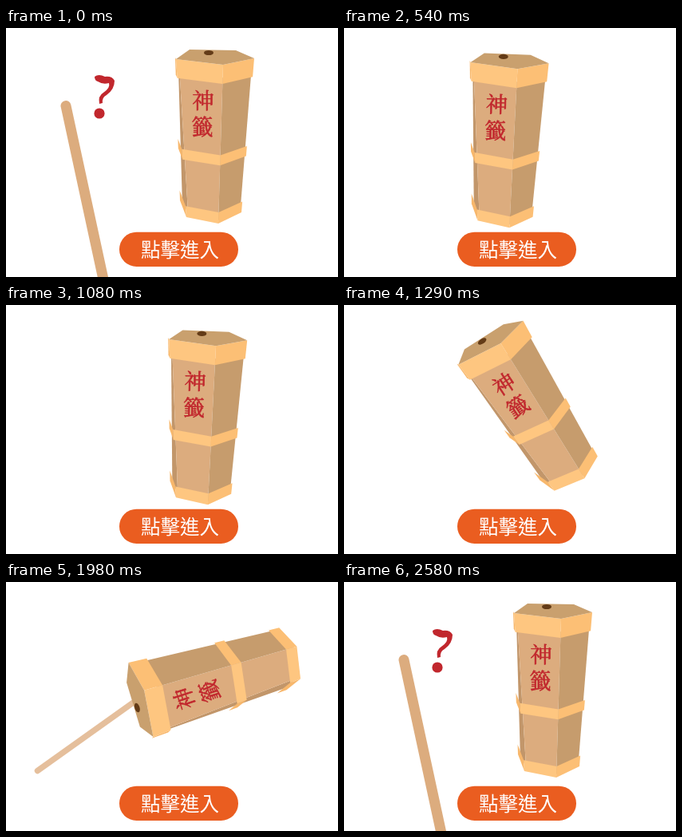
An HTML page that plays this animation: 416x312 px, repeating every 2.7 s.

```html
<!DOCTYPE html>
<html lang="zh-Hant">
<head>
<meta charset="utf-8">
<style>
html, body { margin: 0; width: 100%; height: 100%; overflow: hidden; background: #fff; }
svg { display: block; width: 416px; height: 312px; }
text { text-anchor: middle; font-family: "Noto Sans CJK TC", "Noto Sans CJK", sans-serif; }
.sign { font: 27.5px "Noto Serif CJK TC", "Noto Serif CJK", "Noto Sans CJK TC", "Noto Sans CJK", serif; fill: #c1272d; stroke: #c1272d; stroke-width: .6; }
</style>
</head>
<body>
<svg viewBox="0 0 416 312">
  <line id="rod" stroke-linecap="round"/>
  <g id="mark" fill="#c1272d">
    <path d="M111 61Q116 57 124 61Q133 60 136 66Q136 77 126 84Q120 87 121 94L117 95Q115 85 122 81Q131 75 129 69Q121 71 115 67Q111 66 111 61Z"/>
    <circle cx="117" cy="107" r="6.6"/>
  </g>
  <g id="tube">
    <g id="sides"></g>
    <ellipse cx="254" cy="31" rx="6" ry="3.1" fill="#633b17"/>
    <text class="sign" x="247" y="101">神</text>
    <text class="sign" x="246" y="134">籤</text>
  </g>
  <rect x="142" y="255.7" width="149" height="43.3" rx="21.6" fill="#ea5d20"/>
  <text x="218" y="286.5" font-size="24.5" font-weight="500" fill="#fff">點擊進入</text>
</svg>
<script>
const $ = id => document.getElementById(id);
const LOOP = 2700, STEP = 30, DEG = Math.PI / 180;
const mix = (a, b, k) => a + (b - a) * k;
const mixAll = (a, b, k) => a.map((v, i) => mix(v, b[i], k));
const ease = k => k * k * (3 - 2 * k);
const span = (t, a, b) => Math.max(0, Math.min(1, (t - a) / (b - a)));

// The four visible edges of the tube: mouth point, base point
const edges = [
  [[212, 37], [218, 216]], [[213, 39], [226, 237]],
  [[272, 46], [266, 245]], [[311, 38], [295, 231]]
];
const wood = ["#c2966a", "#dcac7e", "#c69c6d"];
const trim = ["#f7b76c", "#fec680", "#fcbf75"];
const bands = [[0, .12], [.57, .635], [.93, 1]];
const hole = [254, 31], centre = [258, 138];

function buildTube() {
  const onEdge = (e, k) => mixAll(...edges[e], k);
  const inset = (e, k) => mixAll(onEdge(e, k), onEdge(2, k), .06);
  const poly = (pts, fill) => {
    const el = document.createElementNS("http://www.w3.org/2000/svg", "polygon");
    el.setAttribute("points", pts.join(" "));
    el.setAttribute("fill", fill);
    $("sides").appendChild(el);
  };
  const wrap = (f, a, b, fills) => fills.forEach((fill, e) =>
    poly([f(e, a), f(e + 1, a), f(e + 1, b), f(e, b)], fill));
  wrap(inset, .08, .98, wood);
  for (const [a, b] of bands) wrap(onEdge, a, b, trim);
  poly([onEdge(1, 0), onEdge(2, 0), onEdge(3, 0), [288, 28], [230, 27]], "#c9a06e");
}

// Sideways shaking: shift x, shift y, turn
const shake = t => [-22.5 - 34 * Math.cos((t - 540) * .463 * DEG), 5, 1.2];

// time, then shift x, shift y, turn
const keys = [
  [1170, ...shake(1170)], [1500, 7, -30, -114.4], [1560, 7, -30, -114.4],
  [1980, 7, -17, -107.8], [2310, 4.5, -5, -67.7], [2550, 0, 0, 0]
];

function tubePose(t) {
  if (t < 120 || t >= 2550) return [0, 0, 0];
  if (t < 1170) return shake(t);
  const i = keys.findIndex(k => k[0] > t);
  const [a, ...from] = keys[i - 1], [b, ...to] = keys[i];
  return mixAll(from, to, ease(span(t, a, b)));
}

function holeAt([dx, dy, turn]) {
  const c = Math.cos(turn * DEG), s = Math.sin(turn * DEG);
  const x = hole[0] - centre[0], y = hole[1] - centre[1];
  return [centre[0] + dx + x * c - y * s, centre[1] + dy + x * s + y * c];
}

function setRod(x1, y1, x2, y2, width, stroke) {
  const attrs = { x1, y1, x2, y2, "stroke-width": width, stroke, visibility: "visible" };
  for (const k in attrs) $("rod").setAttribute(k, attrs[k]);
}

// Near view: swings in from the left until it stands
function bigRod(t) {
  const enter = t < 120 ? 0 : 1 - span(t, 2160, 2310);
  const k = t < 120 ? 1 : ease(span(t, 2310, 2490));
  const r = mix(57.7, 77.8, k) * DEG;
  const x = mix(1, 75, k) - 70 * enter, y = mix(80, 97.5, k) + 50 * enter;
  setRod(x, y, x + 330 * Math.cos(r), y + 330 * Math.sin(r), mix(16, 13, k), "#dcac7e");
}

// Far view: slides out of the hole, then drops away
function smallRod(t, [hx, hy]) {
  const out = ease(span(t, 1620, 1950)), drop = span(t, 1980, 2160) ** 2;
  const sx = -190 * drop, sy = 138 * drop;
  setRod(mix(hx, 39.5, out) + sx, mix(hy, 236.5, out) + sy, hx + sx, hy - 10 * out + sy, 7.5, "#e5bf9c");
}

function render(now) {
  const t = Math.min(2580, Math.floor((now % LOOP) / STEP) * STEP);
  const pose = tubePose(t), [dx, dy, turn] = pose;
  $("tube").setAttribute("transform", `translate(${dx} ${dy}) rotate(${turn} ${centre})`);
  if (t < 120 || t >= 2160) bigRod(t);
  else if (t >= 1620) smallRod(t, holeAt(pose));
  else $("rod").setAttribute("visibility", "hidden");
  $("mark").setAttribute("visibility", t < 120 || t >= 2220 ? "visible" : "hidden");
}

buildTube();
const start = performance.now();
function tick() {
  render(performance.now() - start);
  requestAnimationFrame(tick);
}
tick();
</script>
</body>
</html>
```
